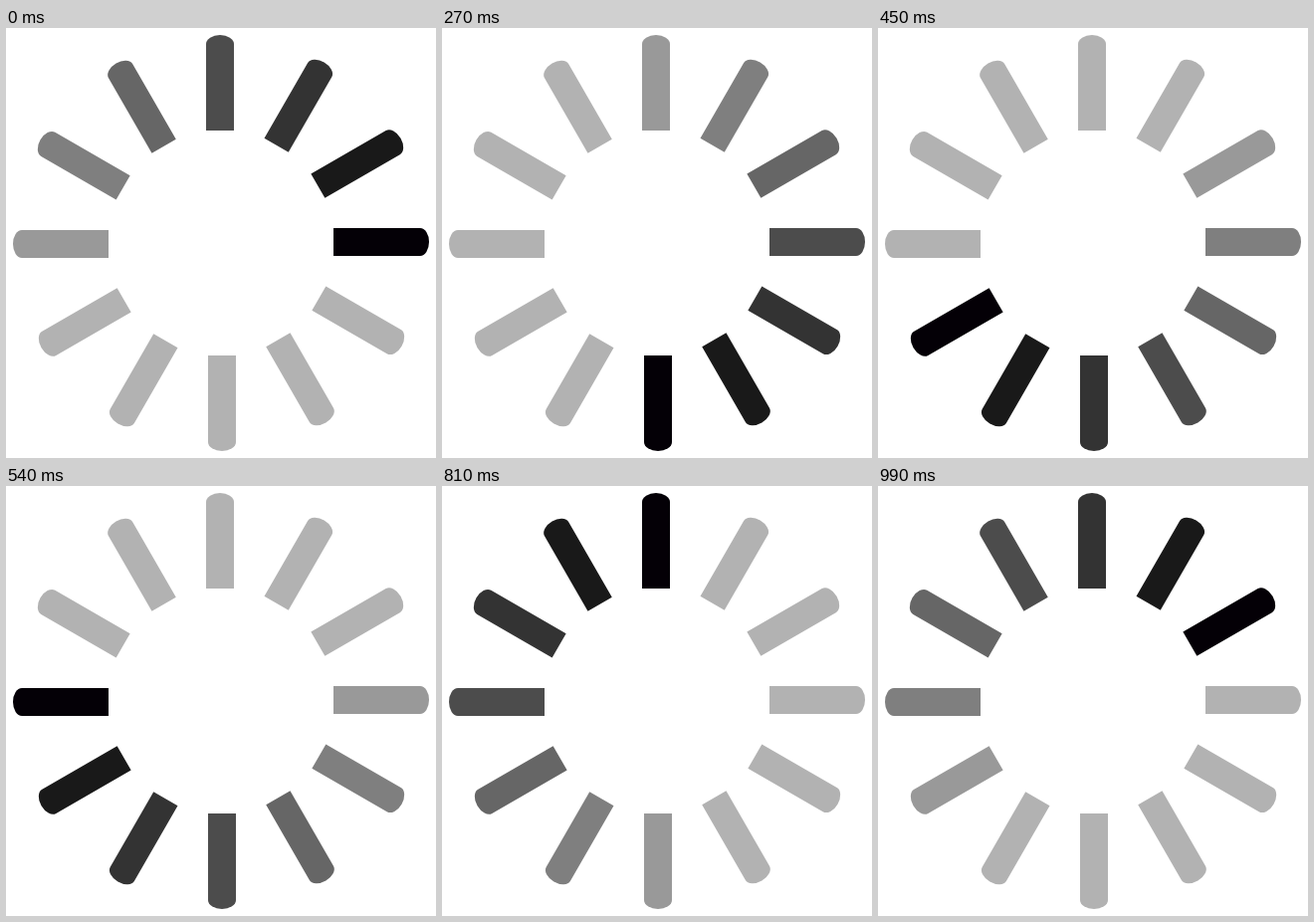
An HTML page for the animation above (1080 ms loop, 432 by 432 pixels).

```html
<!DOCTYPE html>
<html lang="en">
<head>
<meta charset="utf-8">
<title>Spinner</title>
<style>
  html, body { margin: 0; width: 100%; height: 100%; overflow: hidden; background: #fff; }
  svg { display: block; width: 100vw; height: 100vh; }
</style>
</head>
<body>
<svg id="stage" viewBox="0 0 432 432"></svg>
<script>
const COUNT = 12;
const STEP_MS = 90;
const HEAD = 'rgb(4,0,6)';
// Bar pointing right, drawn around the hub, one unit off its axis
const BAR = 'M113 -15H200A9 14 0 0 1 200 13H113Z';

const stage = document.getElementById('stage');
const bars = Array.from({ length: COUNT }, (_, i) => {
  const bar = document.createElementNS('http://www.w3.org/2000/svg', 'path');
  bar.setAttribute('d', BAR);
  bar.setAttribute('transform', `translate(216 216) rotate(${i * 360 / COUNT})`);
  return stage.appendChild(bar);
});

// The tail fades by a tenth per bar, up to 70% white
function shade(age) {
  if (age === 0) return HEAD;
  const v = Math.floor(255 * Math.min(age, 7) / 10);
  return `rgb(${v},${v},${v})`;
}

function draw(ms) {
  const head = Math.floor(ms / STEP_MS) % COUNT;
  bars.forEach((bar, i) => bar.setAttribute('fill', shade((head - i + COUNT) % COUNT)));
}

const start = performance.now();
function tick() {
  draw(performance.now() - start);
  requestAnimationFrame(tick);
}
tick();
</script>
</body>
</html>
```
